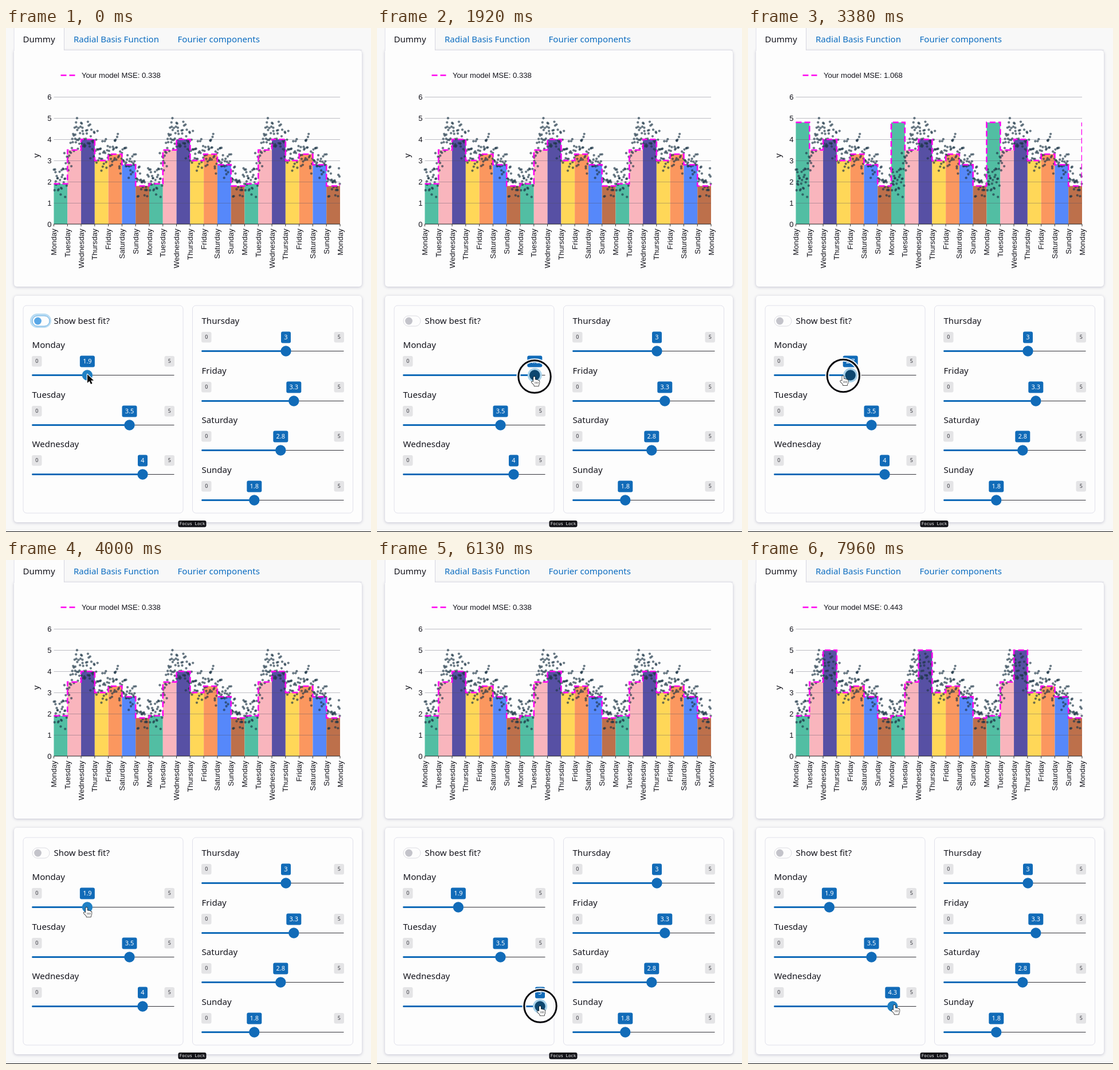
These frames come from a looping animation (637x879 px, 8 s). An HTML page with a canvas:

```html
<!DOCTYPE html>
<html lang="en">
<head>
<meta charset="utf-8">
<title>Weekday model</title>
<style>
html, body { margin: 0; width: 100%; height: 100%; overflow: hidden; background: #f8f8f8; }
canvas { display: block; width: 637px; height: 879px; }
</style>
</head>
<body>
<canvas id="stage"></canvas>
<script>
const W = 637, H = 879, LOOP = 8000;
const canvas = document.getElementById('stage');
const dpr = window.devicePixelRatio || 1;
canvas.width = W * dpr;
canvas.height = H * dpr;
const ctx = canvas.getContext('2d');

const UI = '"Noto Sans", "Open Sans", sans-serif';
const PLOT = '"Liberation Sans", Arial, sans-serif';
const MONO = '"DejaVu Sans Mono", monospace';
const INK = '#14141c', BLUE = '#116bb8', LINK = '#0b6cc0', MAGENTA = '#ff00f0';
const DAYS = ['Monday', 'Tuesday', 'Wednesday', 'Thursday', 'Friday', 'Saturday', 'Sunday'];
const FILLS = ['#52bea3', '#f9b5bd', '#5750a4', '#ffd758', '#fb975f', '#5688fa', '#bd704b'];
const BASE = [1.9, 3.5, 4, 3, 3.3, 2.8, 1.8];

const X0 = 83.5, X1 = 583, Y0 = 342, UNIT = 36.95;
const DAY = (X1 - X0) / 21;
const plotY = v => Y0 - v * UNIT;

// Eased motion through [time, value] pairs
function track(keys, t) {
  if (t <= keys[0][0]) return keys[0][1];
  for (let i = 1; i < keys.length; i++) {
    const [a, va] = keys[i - 1], [b, vb] = keys[i];
    if (t < b) {
      const p = (t - a) / (b - a);
      return va + (vb - va) * p * p * (3 - 2 * p);
    }
  }
  return keys[keys.length - 1][1];
}

const MON = [[1210, 1.9], [1290, 2.5], [1800, 4.8], [3050, 4.8], [3550, 1.9]];
const WED = [[5500, 4], [6100, 5], [7020, 5], [7640, 4.3]];
const CURSOR_X = [[1190, 142], [1290, 214], [1750, 275], [3020, 275], [3520, 141], [4250, 141],
  [5000, 238], [5460, 238], [6060, 285], [6980, 285], [7600, 256]];
const CURSOR_Y = [[1190, 604], [1290, 605], [1800, 608], [3050, 608], [3550, 606], [4250, 606],
  [5000, 774], [5460, 774], [6060, 778], [6980, 778], [7600, 776]];
const HOLDS = [[1210, 2150], [3000, 3650], [5200, 6250], [6700, 7800]];

function rng(seed) {
  return () => (seed = (seed * 16807) % 2147483647) / 2147483647;
}

function makeDots() {
  const mean = [2.1, 1.95, 2.9, 4.1, 4.2, 4, 3.5, 3.2, 3.3, 3.4, 3.3, 3, 2.4, 1.9, 2];
  const rand = rng(4211);
  const dots = [[1.7, 5], [1.63, 4.8], [2, 4.78], [2.66, 4.7], [2.1, 4.55], [0.12, 2.45],
    [0.57, 2.55], [0.83, 1.28], [4.47, 3.95], [6.15, 1.3], [5.3, 3.6], [2.95, 4.35]];
  const count = 205;
  for (let i = 0; i < count; i++) {
    const d = (i + rand()) / count * 7, k = Math.floor(d * 2), f = d * 2 - k;
    const m = mean[k] + (mean[k + 1] - mean[k]) * f;
    const noise = (rand() + rand() + rand() - 1.5) * 0.74;
    dots.push([d, Math.max(1.28, Math.min(4.9, m + noise))]);
  }
  return dots;
}
const DOTS = makeDots();

function text(s, x, y, size, font, color = INK, align = 'left') {
  ctx.font = `${size}px ${font}`;
  ctx.fillStyle = color;
  ctx.textAlign = align;
  ctx.textBaseline = 'alphabetic';
  ctx.fillText(s, x, y);
}

function turned(s, x, y, size, align) {
  ctx.save();
  ctx.translate(x, y);
  ctx.rotate(-Math.PI / 2);
  text(s, 0, 0, size, PLOT, INK, align);
  ctx.restore();
}

function box(x, y, w, h, r, fill, stroke) {
  ctx.beginPath();
  ctx.roundRect(x, y, w, h, r);
  if (fill) { ctx.fillStyle = fill; ctx.fill(); }
  if (stroke) { ctx.strokeStyle = stroke; ctx.lineWidth = 1; ctx.stroke(); }
}

function line(x1, y1, x2, y2, color, width = 1) {
  ctx.beginPath();
  ctx.moveTo(x1, y1);
  ctx.lineTo(x2, y2);
  ctx.strokeStyle = color;
  ctx.lineWidth = width;
  ctx.stroke();
}

function disc(x, y, r, fill) {
  ctx.beginPath();
  ctx.arc(x, y, r, 0, 7);
  ctx.fillStyle = fill;
  ctx.fill();
}

function card(y, h, r) {
  ctx.save();
  ctx.shadowColor = 'rgba(70,70,120,.3)';
  ctx.shadowBlur = 5 * dpr;
  ctx.shadowOffsetY = dpr;
  box(14, y, 607, h, r, '#fdfdfd');
  ctx.restore();
}

function drawPage() {
  ctx.fillStyle = '#f8f8f8';
  ctx.fillRect(0, 0, W, H);
  card(39, 412, [0, 5, 5, 5]);
  card(467, 395, 5);
  line(101, 38.5, 621, 38.5, '#dcdce6');
  box(14, -6, 87.5, 47, 0, '#fdfdfd');
  line(14, 0, 14, 40, '#dedee8');
  line(101.5, 0, 101.5, 39, '#d6d6e0');
  text('Dummy', 29.5, 24.5, 15.05, UI);
  text('Radial Basis Function', 118, 24.5, 15.05, UI, LINK);
  text('Fourier components', 299.5, 24.5, 15.05, UI, LINK);
  box(30, 484, 279, 362, 6, null, '#e0e0ea');
  box(325.5, 484, 280, 362, 6, null, '#e0e0ea');
  box(300.5, 859, 49, 11.5, 3, '#111116');
  text('Focus Lock', 325, 867.4, 7.4, MONO, '#f4f4f4', 'center');
  ctx.fillStyle = '#111';
  ctx.fillRect(0, 878, W, 1);
}

function drawChart(values, mse) {
  ctx.setLineDash([10, 5]);
  line(95.5, 82.5, 120.5, 82.5, MAGENTA, 2.5);
  ctx.setLineDash([]);
  text('Your model MSE: ' + mse, 132, 87, 13.1, PLOT);

  for (let i = 0; i < 21; i++) {
    const top = plotY(values[i % 7]);
    ctx.fillStyle = FILLS[i % 7];
    ctx.fillRect(X0 + i * DAY, top, DAY, Y0 - top);
  }
  for (let v = 0; v <= 6; v++) {
    const y = Math.round(plotY(v)) + 0.5;
    if (v) line(X0, y, X1, y, 'rgba(75,75,95,.36)');
    text(v, 79.5, y + 4.2, 13.1, PLOT, INK, 'right');
  }
  for (let w = 0; w < 3; w++)
    for (const [d, v] of DOTS)
      disc(X0 + (w * 7 + d) * DAY, plotY(v), 2.15, 'rgba(30,54,72,.66)');

  ctx.save();
  ctx.beginPath();
  ctx.rect(X0 - 1, 100, X1 - X0 + 1, 243);
  ctx.clip();
  ctx.beginPath();
  ctx.moveTo(X0, plotY(values[0]));
  for (let i = 0; i < 21; i++) {
    const x = X0 + (i + 1) * DAY;
    ctx.lineTo(x, plotY(values[i % 7]));
    ctx.lineTo(x, plotY(values[(i + 1) % 7]));
  }
  ctx.setLineDash([10, 5]);
  ctx.strokeStyle = MAGENTA;
  ctx.lineWidth = 2.6;
  ctx.stroke();
  ctx.restore();

  line(X0, Y0, X1, Y0, '#222');
  for (let i = 0; i <= 21; i++) {
    const x = X0 + i * DAY;
    line(x, Y0, x, Y0 + 4, '#333');
    turned(DAYS[i % 7], x + 4.5, 350, 13.1, 'right');
  }
  turned('y', 58, 222.5, 15, 'center');
}

function drawToggle(focus) {
  if (focus) box(42, 498, 37, 25, 12.5, '#b9dcf3');
  box(46, 502, 30, 18, 9, '#fdfdfd', focus ? '#69aee2' : '#dcdce2');
  disc(55.5, 511, 6.4, focus ? '#59a7e6' : '#c3c3ca');
  text('Show best fit?', 83.5, 516.3, 15.05, UI);
}

function drawSlider(name, left, y, value, state) {
  const x = left + 9 + value * 46;
  const label = String(Math.round(value * 10) / 10);
  const half = label.length > 1 ? 13 : 8.5;
  text(name, left, y - 47.3, 15.05, UI);

  const tag = (s, tx) => {
    box(tx, y - 33.5, 17.5, 18.5, 3, '#e4e4e6');
    text(s, tx + 8.75, y - 21.3, 9, UI, '#33333a', 'center');
  };
  if (x - half > left + 17.5) tag('0', left - 0.5);
  if (x + half < left + 231) tag('5', left + 231);
  box(x - half, y - 34, half * 2, 20, 3, BLUE);
  text(label, x, y - 20.2, 11, UI, '#fff', 'center');

  line(left, y, left + 248, y, '#33333a');
  line(left, y, x, y, BLUE, 3);
  if (state === 'active') disc(x, y, 12.5, '#a9d2ea');
  disc(x, y, 9.2, { active: '#0e476f', hover: '#2080c4' }[state] || BLUE);
}

function drawRing(x, y, r) {
  for (const [color, width] of [['rgba(255,255,255,.9)', 7], ['#0a0a0e', 3]]) {
    ctx.beginPath();
    ctx.arc(x, y, r, 0, 7);
    ctx.strokeStyle = color;
    ctx.lineWidth = width;
    ctx.stroke();
  }
}

const SHAPES = {
  arrow: new Path2D('M0 0V15L3.6 11.7L6 17L8.6 15.9L6.2 10.8H11Z'),
  hand: new Path2D('M-2 1.5Q-2 0 -.5 0Q1 0 1 1.5V5.5Q3 4.8 3.6 6Q5.6 5.5 6.2 6.8Q8.5 6.6 8.5 8.6V11Q8.5 13 7 14.6V16.5H-.6V14.8L-4.8 10.4Q-5.7 9 -4.5 8.4Q-3.2 8 -2 9.6Z'),
  down: new Path2D('M-1 -3H1V3H3.5L0 7L-3.5 3H-1Z')
};

function drawCursor(kind, x, y) {
  ctx.save();
  ctx.translate(x, y);
  ctx.lineJoin = 'round';
  const dark = kind !== 'hand';
  ctx.lineWidth = dark ? 2.2 : 1.4;
  ctx.strokeStyle = dark ? '#fff' : '#111';
  ctx.fillStyle = dark ? '#0a0a0a' : '#fff';
  ctx.stroke(SHAPES[kind]);
  ctx.fill(SHAPES[kind]);
  if (kind === 'down') line(-3.5, 8, 3.5, 8, '#0a0a0a', 1.3);
  if (kind === 'hand') for (const k of [1, 3.5, 6]) line(k, 9, k, 12.5, '#333', 0.8);
  ctx.restore();
}

function draw(t) {
  const hold = HOLDS.find(([a, b]) => t >= a && t < b);
  const snap = v => Math.round(v * 10) / 10;
  const values = BASE.slice(), fitted = BASE.slice();
  values[0] = snap(track(MON, t));
  values[2] = snap(track(WED, t));
  let mse = '0.338';
  if (t >= 2350 && t < 3850) { fitted[0] = 4.8; mse = '1.068'; }
  if (t >= 6450) { fitted[2] = 5; mse = '0.443'; }

  ctx.setTransform(dpr, 0, 0, dpr, 0, 0);
  drawPage();
  drawChart(fitted, mse);
  drawToggle(t < HOLDS[0][0]);

  const cx = track(CURSOR_X, t), cy = track(CURSOR_Y, t);
  const target = t < 4500 ? 0 : 2;
  DAYS.forEach((name, i) => {
    const left = i < 3 ? 45.5 : 341.5;
    const y = Math.round(i < 3 ? 605 + i * 86.7 : 563 + (i - 3) * 86.7) + 0.5;
    const near = Math.abs(cy - y) < 12 && i === target;
    const state = i !== target ? '' : hold ? 'active' : near ? 'hover' : '';
    drawSlider(name, left, y, values[i], state);
  });

  if (hold) drawRing(cx, cy, 28.2 * Math.min(1, (t - hold[0]) / 140));
  const overSlider = t > 1700 && (t < 4330 || t > 4900);
  drawCursor(hold && t < 1700 ? 'down' : overSlider ? 'hand' : 'arrow', cx, cy);
}

const start = performance.now();
function tick() {
  draw((performance.now() - start) % LOOP);
  requestAnimationFrame(tick);
}
draw(0);
requestAnimationFrame(tick);
</script>
</body>
</html>
```
